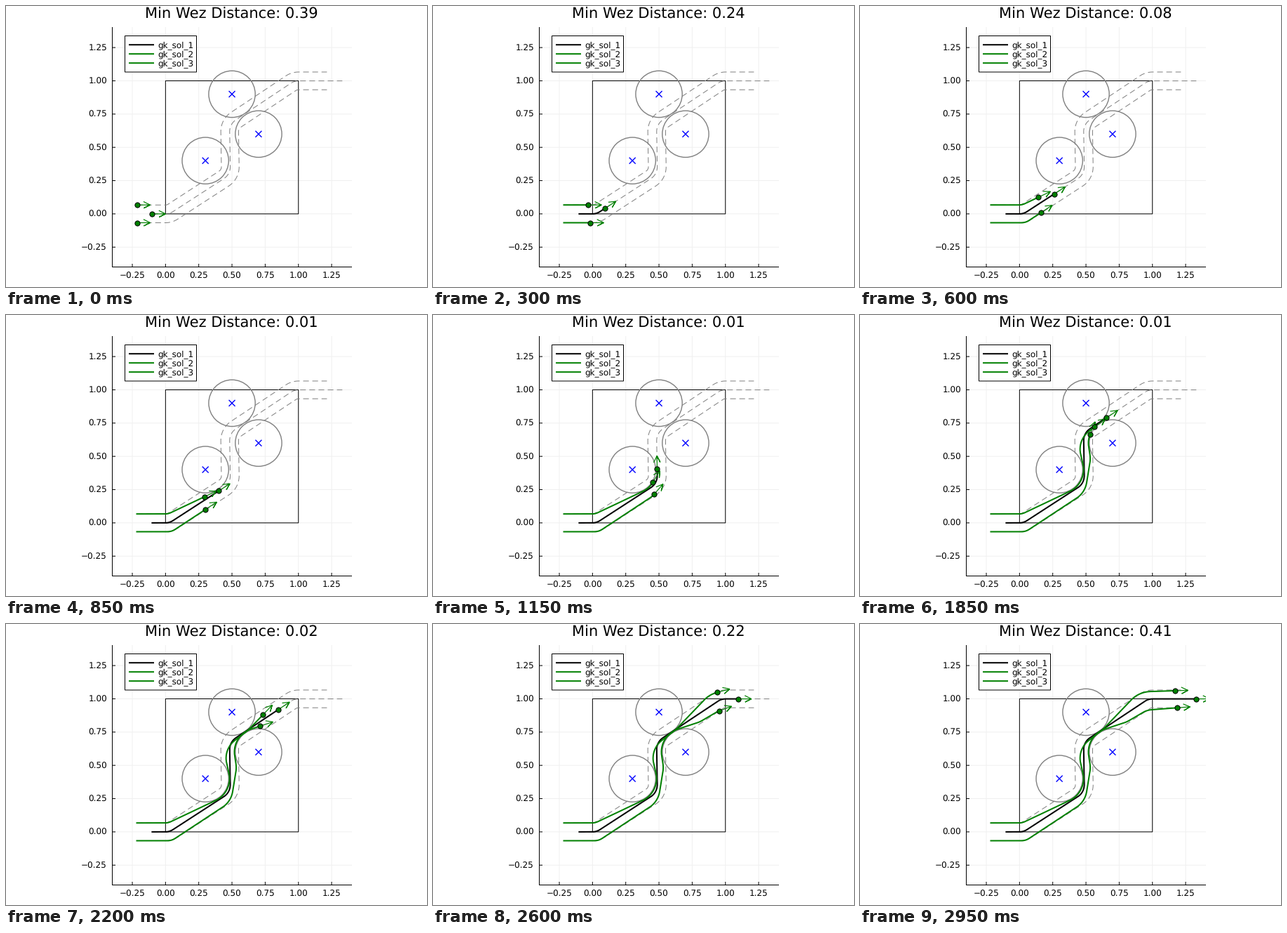
A matplotlib script for the animation above (3 s loop, 600 by 400 pixels).

```python
import numpy as np
import matplotlib.pyplot as plt
from matplotlib.animation import FuncAnimation
from matplotlib.patches import Circle, Rectangle

plt.rcParams.update({"text.hinting": "none", "text.hinting_factor": 1,
                     "font.family": "DejaVu Sans"})

FRAMES, STEP = 60, 50
UNIT, X0, Y0 = 189.4, 227.35, 295.9     # stage pixels per unit, origin
LEFT, TOP, RIGHT, BOTTOM = 151.5, 30.5, 492.5, 371.5
PT = 0.72                               # points per pixel at 100 dpi
GREEN, GRAY = "#008000", "#808080"
TICKS = np.arange(-0.25, 1.3, 0.25)
ZONES = [(0.5, 0.9), (0.7, 0.6), (0.3, 0.4)]
RADIUS = 0.175
SIDE, BACK = 12.63, 21.9                # formation offsets
START, END = 208.4, 479.3
SUB = 8                                 # path samples per frame
COUNT = (FRAMES - 1) * SUB + 1


def stage(x, y):
    return X0 + UNIT * x, Y0 - UNIT * y


def rounded(corners):
    """Polyline of (x, y, fillet radius); returns points and tangents."""
    *p, = np.array(corners, float)
    p, radii = np.array(p)[:, :2], np.array(p)[1:-1, 2]
    d = np.diff(p, axis=0)
    d /= np.hypot(*d.T)[:, None]
    pts, tans = [p[0]], [d[0]]
    for c, r, a, b in zip(p[1:-1], radii, d, d[1:]):
        turn = np.arctan2(a[0] * b[1] - a[1] * b[0], a @ b)
        start = c - a * r * np.tan(abs(turn) / 2)
        normal = np.array([-a[1], a[0]]) * np.sign(turn)
        for w in np.linspace(0, abs(turn), 20):
            pts.append(start + r * (a * np.sin(w) + normal * (1 - np.cos(w))))
            tans.append(a * np.cos(w) + normal * np.sin(w))
    return np.array(pts + [p[-1]]), np.array(tans + [d[-1]])


def route(start, end, shift=0):
    """Planned path, moved sideways by shift."""
    pts, tan = rounded([(start, 295.9, 0), (233, 295.9, 20),
                        (319.8, 239.7, 20), (318.6, 168, 20),
                        (411, 106.6, 20), (end, 106.6, 0)])
    return pts + shift * np.column_stack([tan[:, 1], -tan[:, 0]])


def hug(zone, h0, h1):
    """Corner whose fillet skirts a zone while the heading goes h0 to h1."""
    r = RADIUS * UNIT + 1.3
    out = np.radians((h0 + h1) / 2 - 90 * np.sign(h1 - h0))
    far = r / np.cos(np.radians(h1 - h0) / 2)
    cx, cy = stage(*zone)
    return cx + far * np.cos(out), cy - far * np.sin(out), r


def travel(pts, lag=0):
    """Position at each sample at even speed; lag holds the start back."""
    s = np.r_[0, np.cumsum(np.hypot(*np.diff(pts, axis=0).T))]
    u = np.linspace(0, 1, COUNT)
    u = (u - lag * (1 - u) * np.minimum(5 * u, 1)) * s[-1]
    return np.column_stack([np.interp(u, s, pts[:, i]) for i in (0, 1)])


upper, _ = rounded([(START - BACK, 283.2, 0), (231, 283.2, 20),
                    hug(ZONES[2], 25.5, 103), (309.8, 178.1, 32),
                    hug(ZONES[0], 37, 47), (397.5, 96.6, 40),
                    (448.5, 95, 0)])
lower, _ = rounded([(START - BACK, 308.5, 0), (236, 308.5, 20),
                    (320.7, 252.9, 33), (328.6, 204.5, 40),
                    hug(ZONES[1], 99, 18), (380, 139.5, 40),
                    (409, 122.5, 30), (451.5, 119.3, 0)])
paths = [travel(route(START, END)), travel(upper, 0.015), travel(lower)]

fig = plt.figure(figsize=(6, 4), dpi=100, facecolor="white")
ax = fig.add_axes([0, 0, 1, 1])
ax.set(xlim=(0, 600), ylim=(400, 0))
ax.axis("off")
window = Rectangle((LEFT, TOP), RIGHT - LEFT, BOTTOM - TOP,
                   transform=ax.transData)


def line(x, y, color="black", width=1, z=2, **kw):
    return ax.plot(x, y, color=color, lw=width * PT, zorder=z, snap=False,
                   **kw)[0]


def box(x, y, w, h, face="none", z=2):
    ax.add_patch(Rectangle((x, y), w, h, fc=face, ec="black", lw=PT,
                           zorder=z, snap=False))


def text(x, y, s, size=11.8, ha="center", z=2):
    return ax.text(x, y, s, size=size * PT, ha=ha, va="baseline", zorder=z)


# Axes and grid
for v in TICKS:
    x, y = stage(v, v)
    label = f"{v:.2f}".replace("-", "\u2212")
    line([x, x], [TOP, BOTTOM], "#f0f0f0", z=1)
    line([LEFT, RIGHT], [y, y], "#f0f0f0", z=1)
    line([x, x], [BOTTOM, BOTTOM - 4])
    line([LEFT, LEFT + 4], [y, y])
    text(x, 387.4, label)
    text(144, y + 4.3, label, ha="right")
line([LEFT, LEFT, RIGHT], [TOP, BOTTOM, BOTTOM])
title = text(321.6, 18, "", 20.65)

# Arena, zones and planned routes
box(*stage(0, 1), UNIT, UNIT)
for pts in (route(START, END), route(START - BACK, END - BACK, SIDE),
            route(START - BACK, END - BACK, -SIDE)):
    line(*pts.T, GRAY, z=3, dashes=(8.1, 5), dash_capstyle="butt")
for zone in ZONES:
    cx, cy = stage(*zone)
    ax.add_patch(Circle((cx, cy), RADIUS * UNIT, fill=False, lw=1.4 * PT,
                        ec=GRAY, zorder=3))
    for s in (-4, 4):
        line([cx - 4, cx + 4], [cy - s, cy + s], "blue", 1.4, 3)

# Legend
box(169.5, 42.5, 102, 51.5, "white", 8)
COLORS = ["black", GREEN, GREEN]
for i, color in enumerate(COLORS):
    y = 55.2 + 13 * i
    line([175, 211], [y, y], color, 2, 9, solid_capstyle="butt")
    text(216.3, y + 3.9, f"gk_sol_{i + 1}", ha="left", z=9)

trails = [line([], [], c, 2, 4) for c in COLORS]
arrows = [line([], [], GREEN, 1.2, 5, solid_joinstyle="miter")
          for _ in COLORS]
dots = [line([], [], GREEN, z=6, marker="o", ms=7.2 * PT, mec="black",
             mew=PT) for _ in COLORS]
for art in trails + arrows + dots:
    art.set_clip_path(window)


def arrow(p, d):
    """Open arrow 0.1 units long from p along d."""
    n = np.array([-d[1], d[0]])
    tip = p + 0.1 * UNIT * d
    return np.array([p, tip, tip - 9 * d + 4.5 * n, tip, tip - 9 * d - 4.5 * n])


def draw(k):
    j = k * SUB
    gap = np.inf
    for path, trail, shaft, dot in zip(paths, trails, arrows, dots):
        p = path[j]
        d = path[min(j + 1, COUNT - 1)] - path[max(j - 1, 0)]
        trail.set_data(*path[:j + 1].T)
        shaft.set_data(*arrow(p, d / np.hypot(*d)).T)
        dot.set_data([p[0]], [p[1]])
        for zone in ZONES:
            gap = min(gap, np.hypot(*(p - stage(*zone))) / UNIT - RADIUS)
    title.set_text(f"Min Wez Distance: {max(gap, 0):.2f}")
    return trails + arrows + dots + [title]


anim = FuncAnimation(fig, draw, frames=FRAMES, interval=STEP, repeat=True,
                     repeat_delay=0)
plt.show()
```
